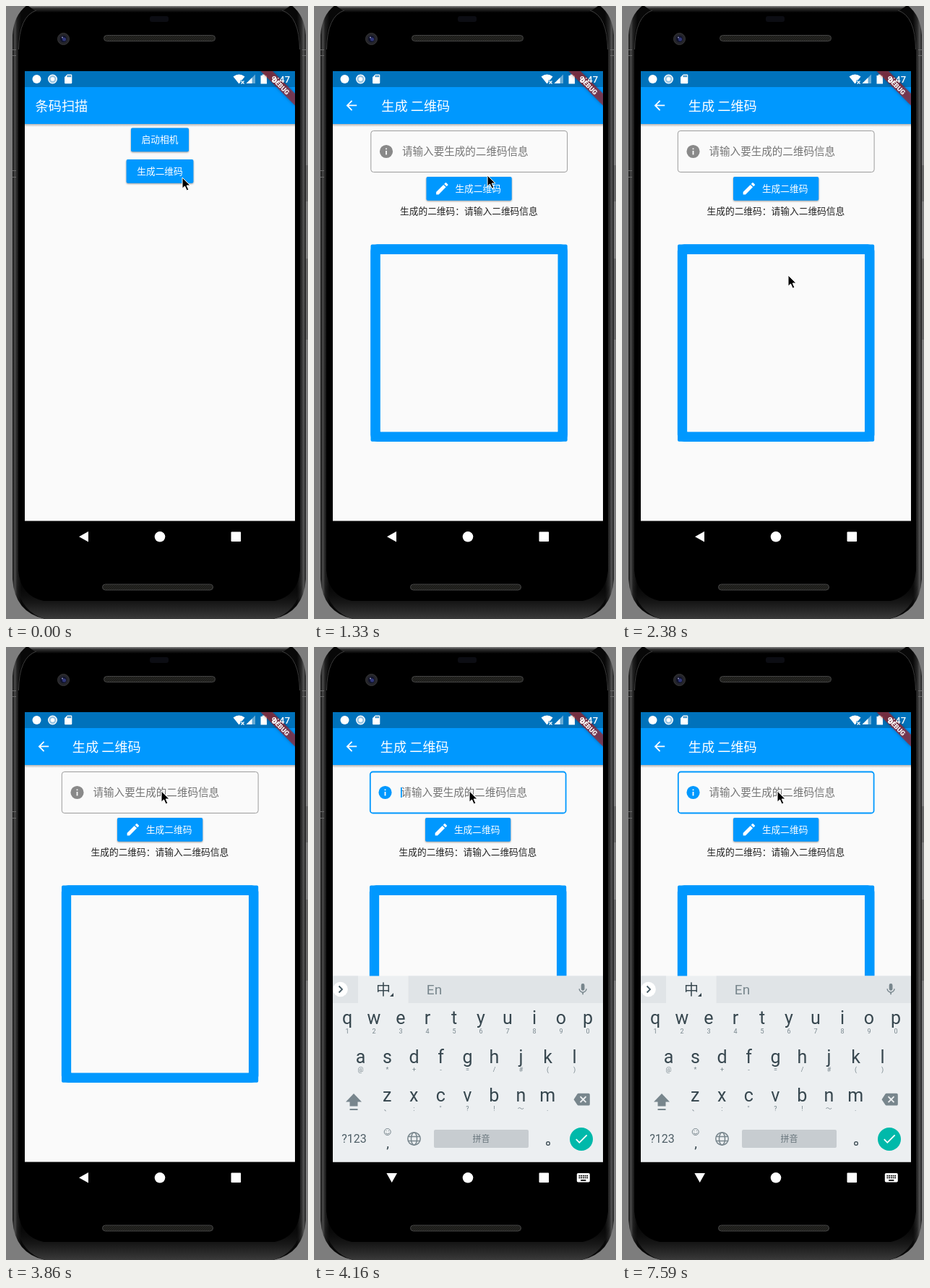
These frames come from a looping animation (418x847 px, 8 s). An HTML page:

```html
<!DOCTYPE html>
<html lang="zh">
<head>
<meta charset="utf-8">
<style>
html, body { margin: 0; width: 100%; height: 100%; overflow: hidden; background: #7d7d7d; }
svg { display: block; width: 100%; height: 100%; fill-rule: evenodd; }
text { font-family: Roboto, "Noto Sans CJK SC", "Noto Sans CJK", sans-serif; white-space: pre; }
.mid { text-anchor: middle; }
.cjk { font-family: "Noto Sans CJK SC", "Noto Sans CJK", sans-serif; }
.btn { fill: #0098fe; filter: drop-shadow(0 1px 1px #0006); }
</style>
</head>
<body>
<svg viewBox="0 0 418 847">
  <defs>
    <linearGradient id="side">
      <stop offset="0" stop-color="#111"/><stop offset=".008" stop-color="#4a4a4a"/>
      <stop offset=".016" stop-color="#202020"/><stop offset=".03" stop-color="#080808"/>
      <stop offset=".97" stop-color="#080808"/><stop offset=".985" stop-color="#2a2a2a"/>
      <stop offset=".993" stop-color="#555"/><stop offset="1" stop-color="#161616"/>
    </linearGradient>
    <linearGradient id="base" x2="0" y2="1">
      <stop offset="0" stop-color="#090909" stop-opacity="0"/>
      <stop offset=".7" stop-color="#242424"/><stop offset="1" stop-color="#3a3a3a"/>
    </linearGradient>
    <linearGradient id="rim" x2="0" y2="1">
      <stop offset="0" stop-color="#8a8a8a"/><stop offset=".35" stop-color="#333"/><stop offset="1" stop-color="#000"/>
    </linearGradient>
    <linearGradient id="drop" x2="0" y2="1">
      <stop offset="0" stop-color="#000" stop-opacity=".28"/><stop offset="1" stop-color="#000" stop-opacity="0"/>
    </linearGradient>
    <pattern id="mesh" width="3" height="3" patternUnits="userSpaceOnUse">
      <path fill="#1b1b19" d="M0 0h3v3H0z"/><path stroke="#33332e" stroke-width=".7" d="M0 3L3 0"/>
    </pattern>
    <clipPath id="screen"><path d="M26 90h374v621.5H26z"/></clipPath>
    <clipPath id="pill"><rect x="166.6" y="212" width="92.8" height="32.7" rx="2"/></clipPath>
  </defs>

  <!-- phone body -->
  <path fill="#666" d="M413 220h5v50h-5zM413 349h5v112h-5z"/>
  <path fill="url(#side)" d="M9 40Q11 12 29 -1H395Q413 12 415 40V792Q412 838 370 847H54Q12 838 9 792z"/>
  <path fill="#6a6a6a" d="M9 60h5v1H9zM9 68h5v1H9zM9 227h5v1H9zM9 236h5v1H9zM410 60h5v1h-5zM410 68h5v1h-5z"/>
  <path fill="url(#base)" d="M14 800Q60 822 110 822H314Q364 822 410 800Q402 838 370 847H54Q22 838 14 800z"/>
  <path fill="#000" d="M17 50Q18 12 46 7H378Q406 12 407 50V780Q404 815 372 822H52Q20 815 17 780z"/>
  <path fill="url(#rim)" d="M31 0H393L380 9H44z"/>
  <path fill="none" stroke="#3c3c3c" d="M17.500 60Q18 14 42 6M406.500 60Q406 14 382 6"/>
  <rect x="199" y="14" width="26" height="8" rx="3" fill="#0c0d13"/>
  <circle cx="79.500" cy="45.500" r="8" fill="#25252b" stroke="#363636"/>
  <circle cx="79.500" cy="45.500" r="4.500" fill="#11142c"/>
  <circle cx="80.500" cy="46" r="2.500" fill="#30377a"/>
  <circle cx="78" cy="43.500" r="1" fill="#9a9cc0"/>
  <rect x="135.500" y="40.500" width="154" height="8" rx="4" fill="url(#mesh)" stroke="#444"/>
  <rect x="133.500" y="799" width="153" height="8" rx="4" fill="url(#mesh)" stroke="#444"/>

  <g clip-path="url(#screen)">
    <path fill="#fafafa" d="M26 90h374v622H26z"/>
    <path fill="#0098fe" d="M26 111h374v52H26z"/>
    <path fill="url(#drop)" d="M26 163h374v4H26z"/>
    <path fill="#0072bb" d="M26 90h374v22H26z"/>

    <g id="home">
      <text class="cjk" x="40.600" y="144.500" font-size="18.180" fill="#fff">条码扫描</text>
      <rect class="btn" x="173" y="168.500" width="80" height="32.700" rx="2"/>
      <text class="cjk mid" x="213" y="189.300" font-size="12.730" fill="#fff">启动相机</text>
      <rect class="btn" x="166.600" y="212" width="92.800" height="32.700" rx="2"/>
      <g id="press" clip-path="url(#pill)" fill="#c8c8c8">
        <path opacity=".22" d="M166 211h95v35h-95z"/>
        <circle id="ripple" cx="241" cy="232" opacity=".35"/>
      </g>
      <text class="cjk mid" x="213" y="233" font-size="12.730" fill="#fff">生成二维码</text>
    </g>

    <g id="maker">
      <path fill="#fff" transform="translate(41 126.500) scale(.909)" d="M20 11H7.830l5.590-5.590L12 4l-8 8 8 8 1.410-1.410L7.830 13H20z"/>
      <g id="content">
        <text class="cjk" x="91.800" y="144.500" font-size="18.180" fill="#fff">生成 二维码</text>
        <rect id="field" y="172.500" height="57" rx="3.600" fill="none"/>
        <path id="info" transform="translate(87.600 190.100) scale(.909)" d="M12 2a10 10 0 1 0 0 20 10 10 0 0 0 0-20zm1 15h-2v-6h2zm0-8h-2V7h2z"/>
        <text class="cjk" x="120.500" y="206.400" font-size="14.550" fill="#757575">请输入要生成的二维码信息</text>
        <path id="caret" fill="#0098fe" d="M120 194h1.800v14H120z"/>
        <rect class="btn" x="154" y="236" width="118.200" height="32.700" rx="2"/>
        <path fill="#fff" transform="translate(164.900 241.300) scale(.909)" d="M3 17.250V21h3.750L17.810 9.940l-3.750-3.750zM20.710 7.040a1 1 0 0 0 0-1.410l-2.340-2.340a1 1 0 0 0-1.410 0l-1.830 1.830 3.750 3.750z"/>
        <text class="cjk" x="193.900" y="256.900" font-size="12.730" fill="#fff">生成二维码</text>
        <text class="cjk" x="117.500" y="288.100" font-size="12.730" fill="#212121">生成的二维码：请输入二维码信息</text>
        <rect x="83.600" y="336.100" width="259" height="259" rx="2.500" fill="none" stroke="#0098fe" stroke-width="13.600" stroke-linejoin="round"/>
        <path fill="none" stroke="#0098fe" stroke-width="4" stroke-linejoin="round" d="M79 331.500h268.200v268.200H79z"/>
        <path fill="#fafafa" d="M90.400 342.900h245.400v245.400H90.400z"/>
      </g>
    </g>

    <g id="keys">
      <path fill="#eceff1" d="M26 454.500h374v258H26z"/>
      <path fill="#e0e4e7" d="M26 454.500h35v37.500H26zM130.500 454.500H400V492H130.500z"/>
      <circle cx="36.500" cy="473" r="10.300" fill="#fff"/>
      <path fill="none" stroke="#455a64" stroke-width="1.800" d="M34.500 468.500l4.500 4.500-4.500 4.500"/>
      <text class="cjk mid" x="96" y="480.500" font-size="20" fill="#37474f">中</text>
      <path fill="#37474f" d="M110 478v5h-5z"/>
      <text class="mid" x="166.500" y="480" font-size="19" fill="#78868d">En</text>
      <path fill="#78868d" transform="translate(362.500 463.500) scale(.8)" d="M12 14c1.660 0 3-1.340 3-3V5a3 3 0 0 0-6 0v6c0 1.660 1.340 3 3 3zm5.300-3c0 3-2.540 5.100-5.300 5.100S6.700 14 6.700 11H5c0 3.410 2.720 6.230 6 6.720V21h2v-3.280c3.280-.480 6-3.300 6-6.720z"/>
      <g id="letters"></g>
      <path fill="#78868d" d="M55 617l11 11.500h-5.500v6h-11v-6H44zM49.500 638h11v2h-11z"/>
      <path fill="#78868d" transform="translate(359.500 614) scale(.93)" d="M22 3H7c-.690 0-1.230.350-1.590.880L0 12l5.410 8.110c.360.530.900.890 1.590.890h15a2 2 0 0 0 2-2V5a2 2 0 0 0-2-2zm-3 12.590L17.590 17 14 13.410 10.410 17 9 15.590 12.590 12 9 8.410 10.410 7 14 10.590 17.590 7 19 8.410 15.410 12z"/>
      <text class="mid" x="55.500" y="685" font-size="16" fill="#4f5f67">?123</text>
      <g fill="none" stroke="#78868d">
        <circle cx="101.700" cy="670" r="4.500"/>
        <path d="M99 671.500q2.700 3 5.400 0M99.500 668.500h1M103 668.500h1"/>
        <g stroke-width="1.500">
          <circle cx="138.500" cy="679.500" r="8.700"/><ellipse cx="138.500" cy="679.500" rx="4" ry="8.700"/>
          <path d="M131 676.500h15M131 682.500h15"/>
        </g>
      </g>
      <text class="mid" x="102" y="692" font-size="19" fill="#37474f">,</text>
      <rect x="166" y="667" width="131" height="25" rx="2" fill="#c7ccd0"/>
      <text class="cjk mid" x="231.500" y="684" font-size="12" fill="#68757c">拼音</text>
      <circle cx="324" cy="686" r="2.300" fill="none" stroke="#37474f" stroke-width="1.300"/>
      <circle cx="370" cy="680" r="16" fill="#00b9aa"/>
      <path fill="#fff" transform="translate(359 668.500) scale(.92)" d="M9 16.170L4.830 12l-1.420 1.410L9 19 21 7l-1.410-1.410z"/>
    </g>

    <!-- status bar -->
    <g fill="#fff">
      <circle cx="42.500" cy="101" r="6"/>
      <circle cx="64.500" cy="101" r="6" opacity=".6"/>
      <circle cx="64.500" cy="101" r="5.800" fill="none" stroke="#fff" stroke-width="1.300"/>
      <circle cx="64.500" cy="101" r="2.800"/>
      <path transform="translate(78.500 93.200) scale(.64)" d="M18 2h-8L4 8v12c0 1.100.900 2 2 2h12a2 2 0 0 0 2-2V4a2 2 0 0 0-2-2zm-6 6h-2V4h2zm3 0h-2V4h2zm3 0h-2V4h2z"/>
      <path d="M314.500 97.500Q322.500 91.500 330.500 97.500L326.500 102.500H324.500V105L322.500 107.500z"/>
      <path fill="none" stroke="#fff" stroke-width="1.200" d="M325.500 103.500l4 4M329.500 103.500l-4 4"/>
      <path opacity=".4" d="M332.500 107H345V94.500z"/><path d="M332.500 107h8v-8z"/>
      <path d="M352.500 96h2.200v-1.500h4V96h2.300v11.500h-8.500z"/>
    </g>
    <path fill="#b71c1c" fill-opacity=".63" style="filter:drop-shadow(0 0 2px #0008)" d="M351.500 89H368L401 122v16.500z"/>
    <text class="mid" transform="translate(380 111) rotate(45)" y="2.600" font-size="9.200" font-weight="900" fill="#fff">DEBUG</text>
    <text x="367.500" y="106" font-size="13" font-weight="500" fill="#fff">8:47</text>
  </g>

  <!-- navigation bar -->
  <g fill="#fff">
    <path id="back" d="M101 733.300L114 726v14.600z"/>
    <circle cx="213" cy="733.300" r="7.300"/>
    <rect x="311.500" y="726.500" width="13.600" height="13.600" rx="1"/>
    <path id="switcher" transform="translate(362 722.500) scale(.9)" d="M20 5H4c-1.100 0-2 .900-2 2v10a2 2 0 0 0 2 2h16a2 2 0 0 0 2-2V7a2 2 0 0 0-2-2zm-9 3h2v2h-2zm0 3h2v2h-2zM8 8h2v2H8zm0 3h2v2H8zm-1 2H5v-2h2zm0-3H5V8h2zm9 7H8v-2h8zm0-4h-2v-2h2zm0-3h-2V8h2zm3 3h-2v-2h2zm0-3h-2V8h2z"/>
  </g>

  <g id="pointer">
    <circle id="click" cx="1.500" cy=".5" r="9.500" fill="#fff" fill-opacity=".4" stroke="#000" stroke-opacity=".5"/>
    <path stroke="#fff" d="M0 0V15.200L3.500 12l2.700 6 2.600-1.200-2.600-5.800H11z"/>
  </g>
</svg>
<script>
const LOOP = 8000;
const $ = id => document.getElementById(id);
const set = (id, attrs) => { for (const k in attrs) $(id).setAttribute(k, attrs[k]); };
const show = (id, on) => set(id, { display: on ? 'inline' : 'none' });

// letters, hints, first key centre, baseline
const rows = [
  ['qwertyuiop', '1234567890', 46, 521],
  ['asdfghjkl', '@*+-=/#()', 64.5, 574.5],
  ['zxcvbnm', '、:"?!～.', 101.3, 628]
];
const label = (s, x, y, size, fill) =>
  `<text class="mid" x="${x}" y="${y}" font-size="${size}" fill="${fill}">${s}</text>`;
$('letters').innerHTML = rows.map(([keys, hints, x0, y]) => [...keys].map((key, i) => {
  const x = x0 + 37 * i;
  return label(key, x, y, 25, '#37474f') + label(hints[i], x, y + 12.8, 9, '#78868d');
}).join('')).join('');

// time, x, y of the pointer tip
const moves = [
  [0, 244, 237], [140, 239, 235], [290, 232, 224], [590, 240, 234],
  [2380, 230, 372], [2530, 227, 386], [3280, 215, 286], [3420, 213, 222],
  [3570, 213, 207], [3720, 215, 199]
];
const blinks = [4010, 4610, 5060, 5500, 6100, 6550, 6990, 7590];

function draw(t) {
  const within = (a, b) => t >= a && t < b;
  const [, x, y] = moves.findLast(m => m[0] <= t);
  set('pointer', { transform: `translate(${x} ${y})` });
  show('click', within(590, 740) || within(3720, 3860));

  show('home', t < 1330);
  show('press', within(590, 1330));
  set('ripple', { r: t < 740 ? 14 : t < 880 ? 28 : 32 });

  show('maker', t >= 1330);
  set('content', { transform: `translate(${t < 1480 ? 1.5 : 0})` });
  const focus = t >= 4010, settling = within(4010, 4160);
  set('field', {
    x: focus ? 77.8 : 77.3, width: focus ? 270.8 : 271.8,
    stroke: focus ? '#0098fe' : '#9c9c9c', 'stroke-width': focus ? 1.8 : 1
  });
  set('info', { fill: focus ? '#0098fe' : '#898989' });
  show('caret', blinks.filter(b => b <= t).length % 2);

  show('keys', focus);
  set('keys', { opacity: settling ? .7 : 1, transform: `translate(0 ${settling ? 20 : 0})` });
  show('switcher', focus);
  set('back', { transform: `rotate(${focus ? (settling ? -45 : -90) : 0} 107.7 733.3)` });
}

function tick() {
  draw(performance.now() % LOOP);
  requestAnimationFrame(tick);
}
tick();
</script>
</body>
</html>
```
